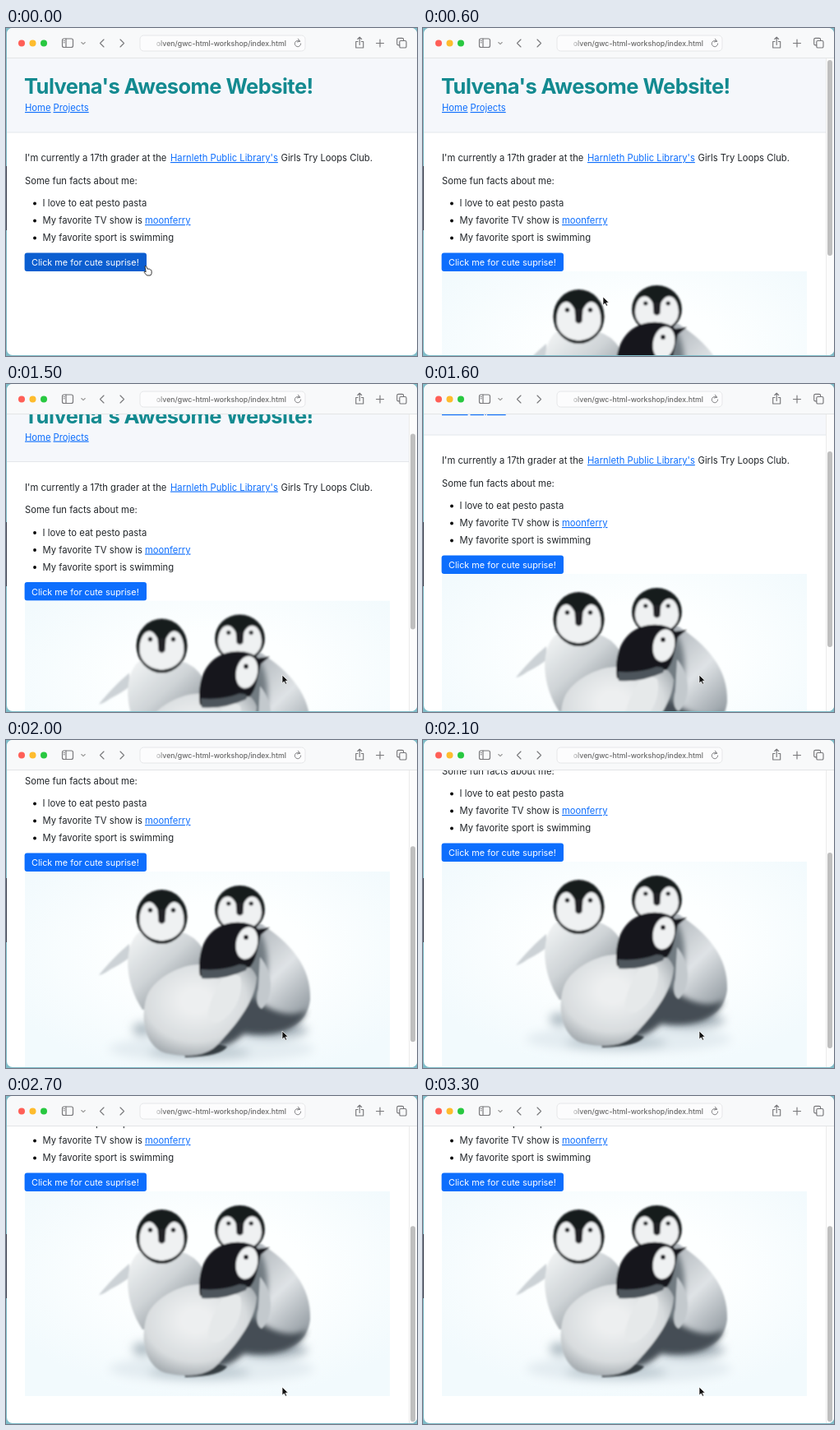
An HTML page for the animation above (3400 ms loop, 500x399 px).

```html
<!DOCTYPE html>
<html lang="en">
<head>
<meta charset="utf-8">
<title>Awesome Website</title>
<style>
  html, body { margin: 0; width: 100%; height: 100%; overflow: hidden; background: #7fbcc8; }
  svg { display: block; width: 500px; height: 399px; }
  text { font: 11.25px Inter, "Open Sans", sans-serif; font-optical-sizing: none; fill: #212529; white-space: pre; }
  .link { fill: #0d6efd; text-decoration: underline; }
  .title { font-size: 25.5px; font-weight: 700; letter-spacing: -.55px; fill: #138a90; }
  .label { font-size: 10.85px; fill: #fff; }
  .url { font-size: 8.75px; font-weight: 500; fill: url(#fade); }
  .icon { fill: none; stroke: #77777a; stroke-width: 1.15; stroke-linecap: round; stroke-linejoin: round; }
</style>
</head>
<body>
<svg viewBox="0 0 500 399">
  <defs>
    <clipPath id="window"><rect x="1" width="499" height="398" rx="7"/></clipPath>
    <clipPath id="view"><rect y="37" width="500" height="362"/></clipPath>
    <clipPath id="frame"><rect x="23" y="116" width="444" height="249"/></clipPath>
    <linearGradient id="fade" gradientUnits="userSpaceOnUse" x1="181" x2="193">
      <stop stop-color="#666" stop-opacity=".15"/><stop offset="1" stop-color="#666"/>
    </linearGradient>
    <radialGradient id="snow" cx=".52" cy=".4" r=".62">
      <stop offset=".4" stop-color="#fdffff"/><stop offset="1" stop-color="#f2fafd"/>
    </radialGradient>
    <linearGradient id="backLeft" x2=".9" y2="1">
      <stop offset=".1" stop-color="#eceff0"/><stop offset=".45" stop-color="#cfd4d7"/><stop offset=".9" stop-color="#858d93"/>
    </linearGradient>
    <linearGradient id="backRight" x1=".1" x2=".9" y2="1">
      <stop offset=".2" stop-color="#b4babf"/><stop offset=".55" stop-color="#dfe3e6"/><stop offset="1" stop-color="#858e95"/>
    </linearGradient>
    <radialGradient id="front" cx=".46" cy=".4" r=".64">
      <stop offset=".2" stop-color="#edeff0"/><stop offset=".7" stop-color="#d8dcde"/><stop offset="1" stop-color="#a0a7ac"/>
    </radialGradient>
    <filter id="soft"><feGaussianBlur stdDeviation=".9"/></filter>
    <filter id="shade" x="-30%" y="-30%" width="160%" height="160%"><feGaussianBlur stdDeviation="3"/></filter>
    <filter id="haze" x="-30%" y="-80%" width="160%" height="260%"><feGaussianBlur stdDeviation="6"/></filter>
    <g id="face">
      <ellipse rx="31" ry="33" fill="#171b1f"/>
      <path d="M0 3C-4-8-9-18-15-18C-22-18-27-8-27 4C-27 20-13 29 0 29S27 20 27 4C27-8 22-18 15-18C9-18 4-8 0 3Z" fill="#eff1f2"/>
      <path d="M-5-9H5L4 6Q0 11-4 6Z" fill="#202428"/>
      <circle cx="-14" cy="-8" r="2.8" fill="#1b1e22"/>
      <circle cx="14" cy="-8" r="2.8" fill="#1b1e22"/>
    </g>
  </defs>

  <!-- desktop showing at the left edge -->
  <rect y="168" width="2" height="78" fill="#3d4352"/>

  <g clip-path="url(#window)">
    <rect width="500" height="399" fill="#fff"/>
    <g clip-path="url(#view)">
      <g id="page">
        <rect id="header" y="37" height="90" fill="#f5f7fb"/>
        <rect id="rule" y="126.5" height="1" fill="#e4e7eb"/>
        <text class="title" x="22" y="80">Tulvena's Awesome Website!</text>
        <text class="link" x="23" y="101">Home</text>
        <text class="link" x="57.5" y="101">Projects</text>
        <text x="23" y="162">I'm currently a 17th grader at the <tspan class="link" x="200">Harnleth Public Library's</tspan><tspan x="334.5">Girls Try Loops Club.</tspan></text>
        <text x="23" y="189.5">Some fun facts about me:</text>
        <circle cx="35" cy="213.5" r="1.9"/>
        <circle cx="35" cy="234.5" r="1.9"/>
        <circle cx="35" cy="255.5" r="1.9"/>
        <text x="44.5" y="217">I love to eat pesto pasta</text>
        <text x="44.5" y="238">My favorite TV show is <tspan class="link" x="169">moonferry</tspan></text>
        <text x="44.5" y="259">My favorite sport is swimming</text>
        <rect id="button" x="22.6" y="273.5" width="148.4" height="22.6" rx="3"/>
        <text class="label" x="31" y="289">Click me for cute suprise!</text>

        <g id="photo" transform="translate(0 180)" clip-path="url(#frame)">
          <rect x="23" y="116" width="444" height="249" fill="url(#snow)"/>
          <g filter="url(#haze)">
            <ellipse cx="250" cy="332" rx="125" ry="17" fill="#e3ecf1"/>
            <ellipse cx="325" cy="309" rx="42" ry="10" fill="#a9b5bd"/>
            <ellipse cx="235" cy="336" rx="62" ry="8" fill="#bdcad1"/>
            <ellipse cx="166" cy="308" rx="12" ry="8" fill="#aebbc3"/>
          </g>
          <g filter="url(#soft)">
            <path d="M150 204C139 213 124 228 113 242Q119 241 127 235Q141 228 151 220Z" fill="#ccd2d6"/>
            <path d="M162 190C142 206 144 252 166 284L244 284L240 210Q228 193 214 190Z" fill="url(#backLeft)"/>
            <use href="#face" x="189.5" y="171"/>
            <path d="M262 178C256 220 262 284 304 304C332 318 366 306 370 272C372 232 345 202 311 180Z" fill="url(#backRight)"/>
            <path d="M306 184C320 205 322 235 312 262L298 300L270 290Z" fill="#727b82" filter="url(#shade)"/>
            <path d="M248 330C272 308 284 282 300 268C318 284 345 297 366 284C358 308 330 318 290 313Q270 332 248 330Z" fill="#454d54" filter="url(#shade)"/>
            <path d="M309 220C325 238 327 268 311 283Q302 278 307 258Z" fill="#c3c9cd"/>
            <use href="#face" transform="translate(284.5 162) scale(.98 .88)"/>
            <path d="M216 335Q246 321 269 329Q262 341 218 342Z" fill="#363c42"/>
            <path d="M238 229C215 228 180 244 171 269C162 298 171 331 195 337C224 343 246 340 259 325C278 304 303 276 305 245Q298 226 280 229Z" fill="url(#front)"/>
            <path d="M270 237C258 253 244 278 246 295Q255 305 268 293C285 278 288 258 285 244Z" fill="#e6e9ea"/>
            <path d="M236 243C232 216 241 190 264 181C281 175 298 178 307 186L321 184L310 193C306 207 305 225 296 233C279 231 256 247 236 243Z" fill="#15191d"/>
            <path d="M237 235Q264 237 284 229Q296 229 292 236Q266 248 238 246Z" fill="#4d555c"/>
            <ellipse cx="293" cy="203" rx="13" ry="20" transform="rotate(12 293 203)" fill="#eff1f2"/>
            <circle cx="292" cy="196" r="2.9" fill="#15191d"/>
          </g>
        </g>
      </g>
      <g id="bar">
        <rect x="490" y="37" width="10" height="362" fill="#fcfcfc"/>
        <rect x="490" y="37" width=".8" height="362" fill="#e6e6e6"/>
        <rect id="thumb" x="492" y="39" width="6" height="238" rx="3" fill="#bfbfbf"/>
      </g>
    </g>

    <rect width="500" height="37" fill="#f8f9fa"/>
    <rect y="36.2" width="500" height=".8" fill="#dfe0e2"/>
    <circle cx="19" cy="18.5" r="4" fill="#ff5f57"/>
    <circle cx="32.5" cy="18.5" r="4" fill="#febc2e"/>
    <circle cx="46" cy="18.5" r="4" fill="#28c840"/>
    <rect x="163" y="9" width="201" height="19" rx="4.5" fill="#fcfcfd" stroke="#e6e7e9"/>
    <text class="url" x="341" y="22" text-anchor="end">olven/gwc-html-workshop/index.html</text>
    <g class="icon">
      <rect x="68.5" y="13" width="13" height="10.5" rx="2"/>
      <path d="M73 13V23.5M70.2 15.5h1M70.2 17.7h1"/>
      <path d="M91.8 17.5l2.2 2.2 2.2-2.2" stroke="#999"/>
      <path d="M119 14l-4.5 4.5 4.5 4.5M139 14l4.5 4.5-4.5 4.5"/>
      <path d="M357.5 16.3A3.7 3.7 0 1 0 358.7 19M355.3 13.2l2.4 3-3.4 .8" stroke-width=".9"/>
      <path d="M428 16.5h-2.3v7.5h9v-7.5h-2.3M430.2 20.5v-9M427.8 13.5l2.4-2.4 2.4 2.4"/>
      <path d="M450.5 18.5h9M455 14v9"/>
      <path d="M475.7 14q0-1.7 1.7-1.7h4.6q1.6 0 1.6 1.7v1.5M475.7 14v5.2q0 1.7 1.7 1.7h1.4"/>
      <rect x="478.8" y="15.5" width="8.2" height="8.5" rx="1.6"/>
    </g>
  </g>

  <g id="cursor">
    <path id="arrow" d="M0 0V10L2.4 7.9L4 11.3L5.6 10.5L4.1 7.2L7.2 7Z" fill="#111" stroke="#fff" stroke-width=".7"/>
    <path id="hand" d="M1 .8Q2-.3 2.8 1L4 4.2Q5 3.5 5.8 4.3Q7 3.9 7.6 5Q8.7 4.9 9 6.2L9.2 9.3L7.8 12H3.4L.2 8.4Q-.3 7.2 1 7.2L2.2 7.8Z" fill="#fff" stroke="#222" stroke-width=".9"/>
  </g>
</svg>
<script>
  const LOOP = 3400, STEP = 100, CLICK = 200, LEAVE = 300;
  const $ = id => document.getElementById(id);
  const set = (id, name, value) => $(id).setAttribute(name, value);
  const show = (id, on) => set(id, "visibility", on ? "visible" : "hidden");

  // Each key holds a time and one or more values, joined by straight lines.
  const scrollKeys = [[1400, 0], [1600, 65], [1800, 112], [2100, 148], [2300, 180]];
  const cursorKeys = [[200, 168, 289], [600, 219, 327], [1100, 336, 354]];

  function sample(keys, t) {
    const next = keys.findIndex(k => k[0] > t);
    if (next === 0) return keys[0].slice(1);
    if (next < 0) return keys.at(-1).slice(1);
    const [a, b] = [keys[next - 1], keys[next]];
    const p = (t - a[0]) / (b[0] - a[0]);
    return a.slice(1).map((v, i) => v + (b[i + 1] - v) * p);
  }

  function draw(t) {
    const [scroll] = sample(scrollKeys, t);
    const open = t >= CLICK, hover = t < LEAVE;
    set("page", "transform", `translate(0 ${-scroll})`);
    set("thumb", "y", 39 + scroll * 0.663);
    for (const id of ["header", "rule"]) set(id, "width", open ? 490 : 500);
    show("photo", open);
    show("bar", open);
    set("button", "fill", hover ? "#0b5ed0" : "#0d6efd");
    set("cursor", "transform", `translate(${sample(cursorKeys, t)})`);
    show("hand", hover);
    show("arrow", !hover);
  }

  const start = performance.now();
  function tick() {
    const t = (performance.now() - start) % LOOP;
    draw(Math.floor(t / STEP) * STEP);
    requestAnimationFrame(tick);
  }
  tick();
</script>
</body>
</html>
```
